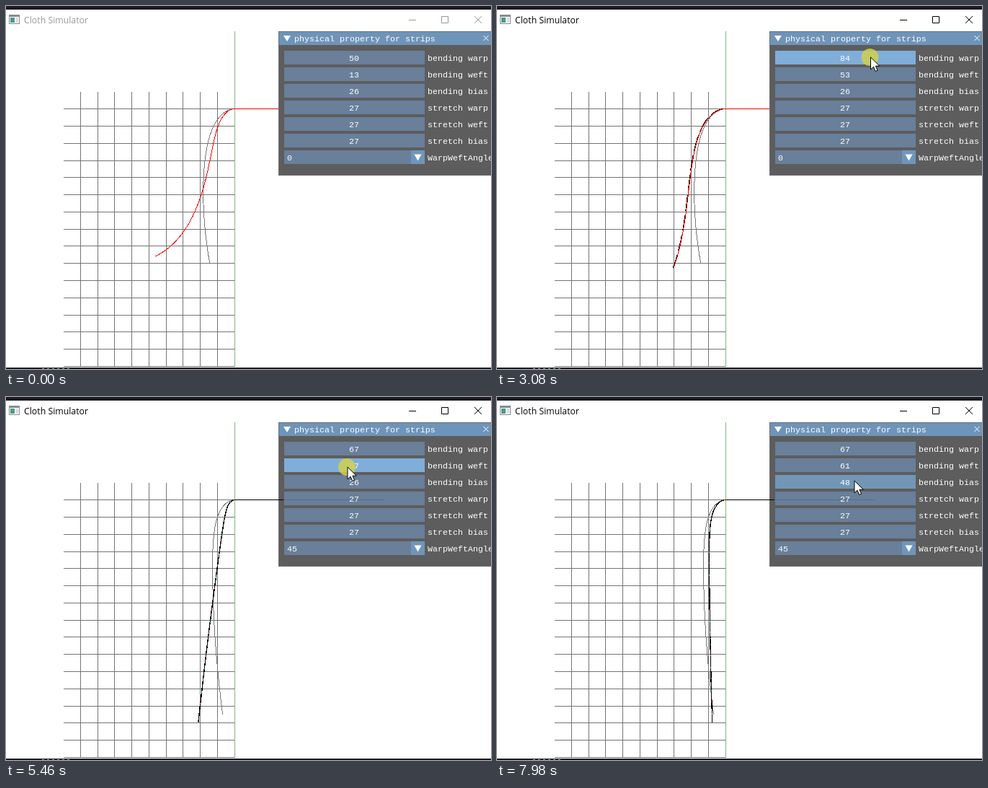
These frames come from a looping animation (673x503 px, 8 s). An HTML page:

```html
<!DOCTYPE html>
<html lang="en">
<head>
<meta charset="utf-8">
<title>Cloth Simulator</title>
<style>
  html, body { margin: 0; width: 100%; height: 100%; overflow: hidden; background: #fff; }
  svg { display: block; width: 100%; height: 100%; }
  .mono { font: 11.66px "Liberation Mono", "DejaVu Sans Mono", monospace; fill: #fff; }
  .title { font: 12.3px "Open Sans", "Noto Sans", sans-serif; }
  .line { fill: none; stroke-width: 1; }
  .crisp { shape-rendering: crispEdges; }
</style>
</head>
<body>
<svg id="stage" viewBox="0 0 673 503" preserveAspectRatio="none"></svg>
<script>
const LOOP = 8000, STEP = 70;
const ORIGIN = { x: 317.5, y: 142.5 };
const CELL = 23.78;
const ROW = { top: 62, pitch: 23, height: 19 };
const FOCUS = 280, APPEAR = 140, TRAVEL = 330;

const COLOR = {
  frame: '#697f9a', hover: '#7196b6', drag: '#7faeda',
  button: '#6f96ba', lit: '#87c0fa', item: '#6f8eac', border: '#6d6d70'
};

// Where the pointer stops. A drag (with dx) adds one to its value per pixel.
const STOPS = [
  { from: 280, to: 1500, x: 478, y: 82, dx: 50 },
  { from: 1820, to: 2160, x: 509, y: 99, dx: 40 },
  { from: 2800, to: 3360, x: 534, y: 71, dx: -33 },
  { from: 3710, to: 3780, x: 501, y: 212 },
  { from: 4270, to: 4340, x: 462, y: 250 },
  { from: 4690, x: 462, y: 134 },
  { from: 5180, to: 5740, x: 469, y: 97, dx: 8 },
  { from: 6230, x: 477, y: 115 },
  { from: 6860, to: 7980, x: 473, y: 116, dx: 22 }
];
const OPEN = STOPS[3].to, SWITCH = STOPS[4].to, BIAS = STOPS[8].from;

// Angle from straight down along s = 0..1: a line plus a cubic,
// reached from horizontal by an exponential turn.
const strip = (len, turn, lean, slope, curl) => ({ len, turn, lean, slope, curl });
const SHAPE = {
  start: strip(243, 13.5, -.15, 0, -.98),
  stiff: strip(242, 11, 0, 0, -.45),
  wide: strip(243, 7.5, -.22, .36, -.48),
  hang: strip(316, 36, -.05, .04, 0),
  round: strip(318, 18.5, 0, .03, 0),
  whip: strip(313, 50, .11, 1.46, -1.9)
};
const REST = [strip(233, 8.7, -.22, .4, 0), strip(311, 14, -.05, .18, 0)];

const svg = document.getElementById('stage');

function add(tag, attrs, parent = svg, text) {
  const el = document.createElementNS('http://www.w3.org/2000/svg', tag);
  for (const k in attrs) el.setAttribute(k, attrs[k]);
  if (text !== undefined) el.textContent = text;
  parent.appendChild(el);
  return el;
}
const rect = (x, y, width, height, fill, parent) =>
  add('rect', { x, y, width, height, fill, class: 'crisp' }, parent);
const path = (d, stroke, extra) =>
  add('path', { d, stroke, class: 'line crisp', ...extra });
const label = (x, y, text, parent, anchor = 'start') =>
  add('text', { x, y, class: 'mono', 'text-anchor': anchor }, parent, text);
const show = (el, on) => el.setAttribute('visibility', on ? 'visible' : 'hidden');

const mix = (a, b, k) => a + (b - a) * k;
const ramp = (t, a, b) => Math.min(1, Math.max(0, (t - a) / (b - a)));
const ease = (t, a, b) => (1 - Math.cos(Math.PI * ramp(t, a, b))) / 2;
const bell = v => Math.exp(-v * v);

function blend(a, b, k) {
  const out = {};
  for (const key in a) out[key] = mix(a[key], b[key], k);
  return out;
}

function curve(p, sway = 0) {
  const N = 120, h = p.len / N;
  let { x, y } = ORIGIN, d = `M${x} ${y}`;
  for (let i = 0; i < N; i++) {
    const s = (i + .5) / N;
    const ang = p.lean + p.slope * s + p.curl * s ** 3
      - (Math.PI / 2 + p.lean) * Math.exp(-p.turn * s) + sway * Math.min(1, 12 * s);
    const a = Math.max(ang, -1.6);
    x += h * Math.sin(a);
    y += h * Math.cos(a);
    d += `L${x.toFixed(1)} ${y.toFixed(1)}`;
  }
  return d;
}

function stripAt(t) {
  if (t < SWITCH) {
    const p = blend(SHAPE.start, SHAPE.stiff, ease(t, 210, 770));
    return curve(blend(p, SHAPE.wide, ease(t, 2100, 3360)));
  }
  // Falls from horizontal as a damped pendulum, later nudged by the bias drag.
  const u = t - SWITCH;
  const p = blend(SHAPE.hang, SHAPE.round, ease(t, BIAS, 7490));
  const fall = -1.5 * bell(u / 900) * Math.cos(2 * Math.PI * u / 1400);
  const nudge = -.13 * Math.sin(Math.PI * ramp(t, BIAS, BIAS + 1050));
  return curve(blend(p, SHAPE.whip, bell((u - 350) / 110)), fall + nudge);
}

const dragged = (s, t) => s.dx ? s.dx * ramp(t, s.from, s.to) : 0;

function mouseAt(t) {
  let { x, y } = STOPS[0];
  for (const s of STOPS) {
    const k = ease(t, s.from - TRAVEL, s.from);
    x = mix(x, s.x, k) + dragged(s, t);
    y = mix(y, s.y, k);
  }
  return [x, y];
}

// Window
rect(0, 0, 673, 503, '#fff');
rect(0, 0, 673, 5, '#1c1a22');
rect(0, 501, 673, 2, '#1c1a22');
path('M50 502.5H88', '#aaa', { 'stroke-dasharray': '3 4' });
rect(4, 12, 15, 13, '#858b90');
rect(5, 15, 13, 9, '#fff');
rect(6, 16, 6, 7, '#4c9a8c');
rect(14, 16, 3, 7, '#d5dade');
const title = add('text', { x: 25, y: 24, class: 'title' }, svg, 'Cloth Simulator');
const controls = path('M559 19.5H569M604.5 14.5h9v9h-9zM650 14l10 10M660 14l-10 10', '#000',
  { class: 'line' });

// Grid
let grid = '';
for (let i = 1; i < 10; i++) grid += `M${Math.floor(ORIGIN.x - .2 - i * CELL) + .5} 119V500`;
for (let i = 0; i < 16; i++) grid += `M80 ${Math.floor(ORIGIN.y + .2 + i * CELL) + .5}H317`;
path(grid, '#747474');
path('M317.5 35V500', '#82b482');

// Strips
const rest = path('', '#777');
const under = path('', '#000', { transform: 'translate(-.7 -.3)', 'stroke-dasharray': '22 6' });
const cloth = path('', '#f00');
const dots = ['#d02020', '#1c9a30'].map((stroke, i) =>
  path('', stroke, { 'stroke-dasharray': '2 30', 'stroke-dashoffset': 15 * i }));
const arm = path('M317 142.5H378', '#f00');

// Panel
rect(378, 35, 295, 200, COLOR.border);
rect(379, 54, 294, 180, '#5d5d5d');
rect(379, 36, 294, 18, '#6f94b9');
add('path', { d: 'M385 41h10l-5 8z', fill: '#fff' });
label(400, 49, 'physical property for strips');
path('M662.5 41l7 7M669.5 41l-7 7', '#fff', { class: 'line' });

const rows = ['bending warp', 'bending weft', 'bending bias',
  'stretch warp', 'stretch weft', 'stretch bias', 'WarpWeftAngle'].map((name, i) => {
  const y = ROW.top + i * ROW.pitch, combo = i === 6;
  const box = rect(386, y, 195, ROW.height, COLOR.frame);
  const value = label(combo ? 390 : 483, y + 14, '', svg, combo ? 'start' : 'middle');
  label(585, y + 14, name);
  return { y, box, value };
});
const button = rect(562, 200, 19, 19, COLOR.button);
add('path', { d: 'M566.5 205.5h10l-5 9z', fill: '#fff' });
const armEnd = add('g', {});
rect(378, 142, 7, 1, '#000', armEnd);
rect(385, 142, 140, 1, 'rgba(0,0,0,.14)', armEnd);

const popup = add('g', {});
rect(386, 219, 195, 63, COLOR.border, popup);
rect(387, 220, 193, 61, '#606060', popup);
const items = ['0', '45', '90'].map((text, i) => {
  const y = 225 + i * 17;
  const box = rect(388, y, 191, 17, COLOR.item, popup);
  label(390, y + 13, text, popup);
  return { y, box };
});

// Pointer
const pointer = add('g', {});
const press = add('circle', { r: 12, fill: '#d0d04c', 'fill-opacity': .85 }, pointer);
add('path', {
  d: 'M1 0V17L5 13.2L7.7 19.5L10.6 18.2L7.9 12.2H13.3Z',
  fill: '#fff', stroke: '#000', 'stroke-width': 1
}, pointer);

function render(t) {
  const biased = t >= SWITCH, open = t >= OPEN && t < SWITCH;
  const [mx, my] = mouseAt(t);

  const ink = t >= FOCUS ? '#000' : '#999';
  title.setAttribute('fill', ink);
  controls.setAttribute('stroke', ink);

  const values = [50, 13, 26, 27, 27, 27, biased ? 45 : 0];
  const held = STOPS.find(s => t >= s.from && t < s.to);
  for (const s of STOPS) {
    if (s.dx) values[Math.floor((s.y - ROW.top) / ROW.pitch)] += Math.round(dragged(s, t));
  }
  rows.forEach((r, i) => {
    const ref = held ? held.y : my;
    const over = t >= APPEAR && !open && ref >= r.y && ref < r.y + ROW.pitch;
    r.value.textContent = values[i];
    if (i === 6) button.setAttribute('fill', over || open ? COLOR.lit : COLOR.button);
    else r.box.setAttribute('fill', !over ? COLOR.frame : held ? COLOR.drag : COLOR.hover);
  });

  show(popup, open);
  items.forEach((item, i) => {
    const over = my >= item.y && my < item.y + 17;
    item.box.setAttribute('fill', over ? COLOR.drag : COLOR.item);
    item.box.setAttribute('fill-opacity', +(over || i === 0));
  });

  const d = stripAt(t), color = biased ? '#000' : '#f00';
  for (const el of [under, cloth, ...dots]) el.setAttribute('d', d);
  rest.setAttribute('d', curve(REST[+biased]));
  cloth.setAttribute('stroke', color);
  cloth.style.strokeWidth = biased ? 1.4 : 1;
  arm.setAttribute('stroke', color);
  show(under, !biased && t >= 2590);
  dots.forEach(el => show(el, biased));
  show(armEnd, biased);

  show(pointer, t >= APPEAR);
  pointer.setAttribute('transform', `translate(${mx.toFixed(1)} ${my.toFixed(1)})`);
  show(press, t >= APPEAR && held);
}

const began = performance.now();
function tick() {
  const t = (performance.now() - began) % LOOP;
  render(Math.floor(t / STEP) * STEP);
  requestAnimationFrame(tick);
}
render(0);
requestAnimationFrame(tick);
</script>
</body>
</html>
```
